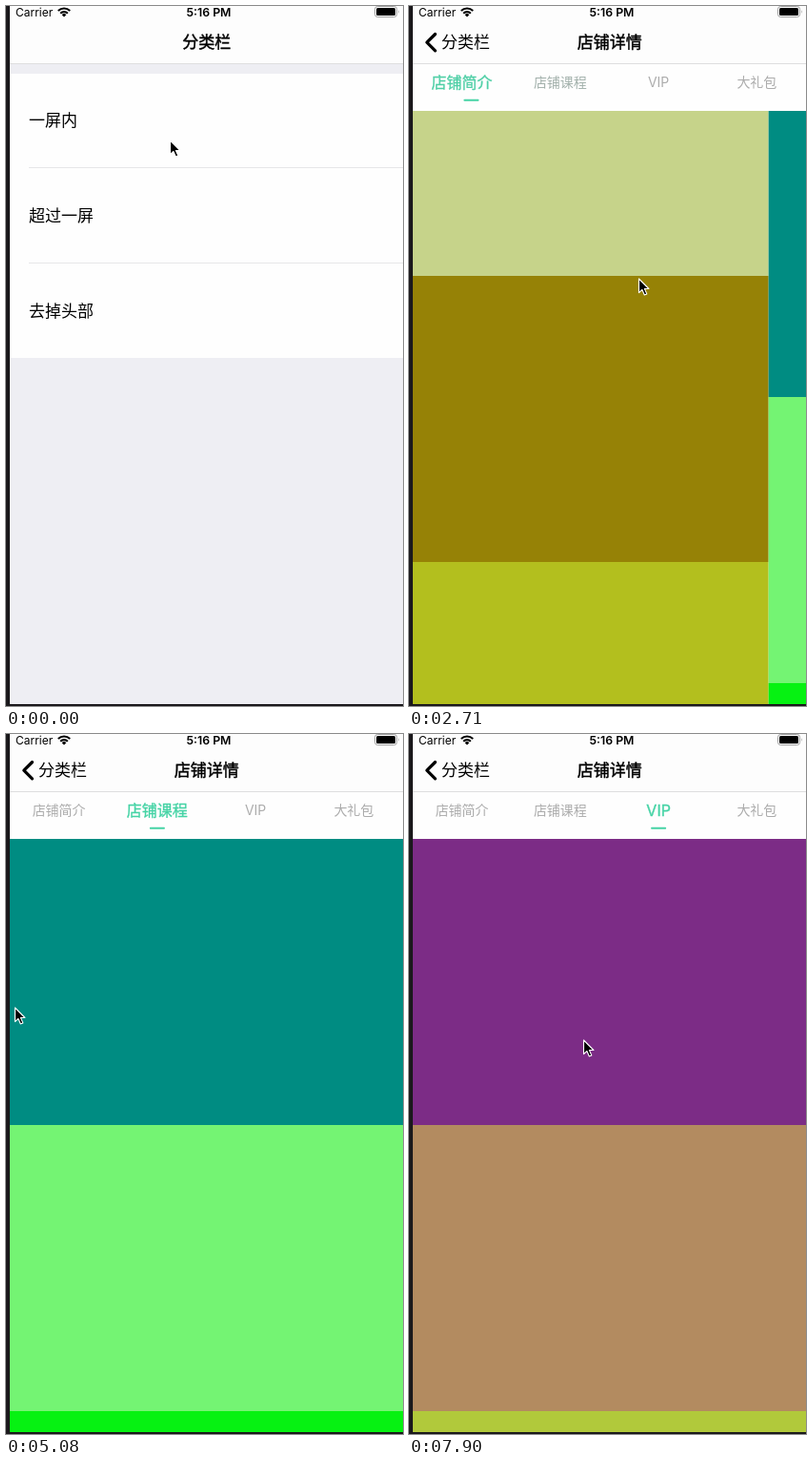
Recreate the animation shown at these times as an HTML page. Size 417x734 px, loop 8000 ms.

```html
<!DOCTYPE html>
<html lang="zh-CN">
<head>
<meta charset="utf-8">
<title>分类栏</title>
<style>
  html, body { margin: 0; width: 100%; height: 100%; overflow: hidden; background: #fefefe; }
  svg { display: block; width: 417px; height: 734px; }
  text { font-family: Inter, "Noto Sans CJK SC", "Noto Sans CJK", sans-serif; fill: #000; }
  .t17 { font-size: 17px; }
  .title { font-size: 17px; text-anchor: middle; stroke: #000; stroke-width: .45px; }
  .status { font-size: 12px; }
  .label { font-size: 13px; fill: #555; }
  .line { fill: none; stroke-linecap: round; stroke-linejoin: round; }
  .tab { font-size: 14px; text-anchor: middle; }
  .tab.on { font-size: 16px; stroke-width: .35px; }
</style>
</head>
<body>
<svg viewBox="0 0 417 734">
  <g id="list">
    <rect x="4" y="60" width="413" height="674" fill="#eeeef3"/>
    <rect x="4" y="71" width="413" height="298" fill="#fefefe"/>
    <rect id="tap" x="4" y="71" width="413" height="98" fill="#d9d9d9"/>
    <path d="M24 169.5H417M24 269.5H417" stroke="#e6e6e8"/>
    <g class="t17">
      <text x="24" y="126.4">一屏内</text>
      <text x="24" y="226.4">超过一屏</text>
      <text x="24" y="326.4">去掉头部</text>
    </g>
  </g>

  <g id="detail">
    <rect x="4" y="60" width="413" height="674" fill="#fefefe"/>
    <g id="head">
      <g class="line" stroke="#4a4a4a" stroke-width="1.2">
        <rect x="15.5" y="95.5" width="19" height="16" rx="2.5"/>
        <path d="M16.5 98.5L25 104.5L33.5 98.5"/>
        <path d="M387.5 99V111.5M391.5 93V111.5M395.5 106V111.5M399.5 103V111.5M403.5 97V111.5M407.5 108V111.5"/>
      </g>
      <rect x="36" y="91" width="8" height="8" fill="#ff6b62"/>
      <text x="203" y="221" font-size="11" style="fill:#b8b8b8">会员</text>
      <g class="line" stroke="#a99cf0" stroke-width="1.3">
        <circle cx="72.6" cy="312" r="11.4"/>
        <circle cx="72.6" cy="312" r="8.2" fill="#d8d1fb" stroke="none"/>
        <path d="M63 323H69M76 323H82"/>
        <path d="M69.6 307.5L72.6 311.5L75.6 307.5M72.6 311.5V317M69.8 312H75.4M69.8 314.4H75.4" stroke="#fff"/>
      </g>
      <g class="line" stroke="#f08f8f" stroke-width="1.2">
        <path d="M274 313L281 306.5L287 311L294 305V321H274Z" fill="#fbd3d3" stroke="none"/>
        <path d="M273.5 310.5L281 303.5L287 308.5L296 301.5M291.5 301.5H296.5V306M274 321H294.5M274.5 314V321M281 309V321M287.5 313V321M294 307V321"/>
      </g>
      <text class="label" x="95" y="306.7">累计收益</text>
      <text class="label" x="307" y="306.7">累计销量</text>
      <rect x="4" y="347" width="413" height="10" fill="#f5f5f9"/>
    </g>
    <g id="pages"></g>
    <g id="tabs">
      <rect x="4" y="60" width="413" height="50" fill="#fefefe"/>
      <rect id="mark" x="-8" y="97.7" width="16" height="2" rx=".8" fill="#45d3a5"/>
    </g>
  </g>

  <rect x="4" width="413" height="60" fill="#fdfdfd"/>
  <path d="M4 60.5H417" stroke="#dededf"/>
  <text class="title" id="oldTitle" x="210.7" y="44.2">分类栏</text>
  <path class="line" id="chevron" d="M27.5 29.5L18.8 38.2L27.5 46.9" stroke="#000" stroke-width="3.2"/>
  <text class="t17" id="back" x="34" y="44.2">分类栏</text>
  <text class="title" id="newTitle" x="210.7" y="44.2">店铺详情</text>

  <text class="status" x="10" y="10.8">Carrier</text>
  <g class="line" stroke="#000" stroke-width="2.1" style="stroke-linecap:butt">
    <path d="M54.8 5A9 9 0 0 1 67.2 5M57.2 7.7A5.4 5.4 0 0 1 64.8 7.7"/>
    <path d="M61 11.6L58.7 9.2A3.2 3.2 0 0 1 63.3 9.2Z" fill="#000" stroke="none"/>
  </g>
  <text class="status" x="213" y="10.8" text-anchor="middle" font-weight="600" style="font-size:12.3px">5:16 PM</text>
  <rect x="387.5" y=".5" width="23" height="11" rx="2.8" fill="none" stroke="#a0a0a0"/>
  <rect x="389" y="2" width="20" height="8" rx="1.5"/>
  <path d="M412 4Q413.6 6 412 8Z" fill="#a0a0a0"/>

  <rect width="4" height="734" fill="#1b191c"/>
  <rect y="732" width="417" height="2" fill="#1b191c"/>
  <path id="cursor" d="M0 0V14.6L3.4 11.5L5.8 17L8.3 15.9L5.9 10.5H10.4Z" stroke="#fff" stroke-width="1.1" stroke-linejoin="round"/>
</svg>
<script>
const NS = 'http://www.w3.org/2000/svg';
const $ = id => document.getElementById(id);
const LOOP = 8000, START = 486, STEP = 148;
const LEFT = 4, WIDTH = 413, HEAD = 297, CELL = 300, SCROLL = 424;
const DRAG1 = 278.6, DRAG2 = 206;

const PAGES = [
  ['#c6d38a', '#968206', '#b3bf1e'],
  ['#008c82', '#74f473', '#06f212'],
  ['#7c2c86', '#b38b60', '#b1c93b']
];
const TABS = ['店铺简介', '店铺课程', 'VIP', '大礼包'];
const GREY = [172, 172, 172], GREEN = [69, 211, 165];

function add(parent, tag, attrs) {
  const el = document.createElementNS(NS, tag);
  for (const name in attrs) el.setAttribute(name, attrs[name]);
  return parent.appendChild(el);
}

const move = (el, x, y = 0) => el.setAttribute('transform', `translate(${x} ${y})`);
const fade = (el, v) => el.setAttribute('opacity', v);
const tabX = i => LEFT + WIDTH / 4 * (i + .5);

const pages = PAGES.map(colors => {
  const g = add($('pages'), 'g');
  colors.forEach((fill, i) => add(g, 'rect', { x: LEFT, y: i * CELL, width: WIDTH, height: CELL, fill }));
  return g;
});
const bar = add(pages[0], 'rect', { x: 412.5, width: 2.5, height: 155, rx: 1.25, fill: '#000', 'fill-opacity': .38 });
const tabs = TABS.map((name, i) => {
  const el = add($('tabs'), 'text', { x: tabX(i) });
  el.textContent = name;
  return el;
});

function drawNav(push) {
  move($('list'), -.3 * WIDTH * push);
  move($('detail'), WIDTH * (1 - push));
  move($('oldTitle'), -151 * push);
  move($('back'), 151 * (1 - push));
  move($('newTitle'), 206 * (1 - push));
  fade($('oldTitle'), 1 - push);
  for (const id of ['back', 'newTitle', 'chevron']) fade($(id), push);
}

// The label grows only once its page has settled
function drawTabs(pos) {
  const active = Math.floor(pos + .001);
  tabs.forEach((el, i) => {
    const w = Math.max(0, 1 - Math.abs(pos - i));
    const color = `rgb(${GREY.map((c, j) => Math.round(c + (GREEN[j] - c) * w))})`;
    const on = i === active;
    el.setAttribute('class', on ? 'tab on' : 'tab');
    el.setAttribute('y', on ? 86 : 85.2);
    el.style.fill = color;
    el.style.stroke = on ? color : 'none';
  });
  move($('mark'), tabX(pos));
}

function drawPages(scroll, slide, showBar) {
  const lift = Math.min(scroll, HEAD), inner = scroll - lift;
  move($('head'), 0, -lift);
  move($('tabs'), 0, HEAD - lift);
  pages.forEach((g, i) => move(g, i * WIDTH - slide, 407 - lift - (i ? 0 : inner)));
  bar.setAttribute('y', 1 + inner * 1.255);
  fade(bar, showBar && inner > 0 ? 1 : 0);
}

function draw() {
  const k = Math.floor((performance.now() % LOOP - START) / STEP);
  const ramp = (a, b) => Math.min(1, Math.max(0, (k - a) / (b - a)));
  const ease = (a, b, power = 2) => 1 - (1 - ramp(a, b)) ** power;

  // Each swipe is a drag followed by a snap to the next page
  const drag1 = DRAG1 * ease(14, 27.65), drag2 = DRAG2 * ease(35.6, 41.5);
  const snap1 = (WIDTH - DRAG1) * ease(27, 31), snap2 = (WIDTH - DRAG2) * ease(43, 48);

  drawNav(ease(0, 3));
  drawTabs((drag1 + snap1 + drag2 + snap2) / WIDTH);
  drawPages(SCROLL * ease(4, 12.55, 3), drag1 + snap1 + drag2 + snap2, k < 12);
  fade($('tap'), k >= 0 && k < 4 ? 1 : 0);

  const x = 172 + 34 * ramp(2, 4) + 35 * ramp(4, 6) + 39 * ramp(13, 14) - Math.min(drag1, 271)
    + 229 * ramp(32, 35) - drag2 + 151 * ramp(47, 50);
  const y = 141 + 325 * ramp(2, 4) - 180 * ramp(4, 6) + ramp(14, 27) + 27 * ramp(32, 35) + 7 * ramp(47, 50);
  move($('cursor'), Math.round(x) + .5, Math.round(y));
  requestAnimationFrame(draw);
}
draw();
</script>
</body>
</html>
```
